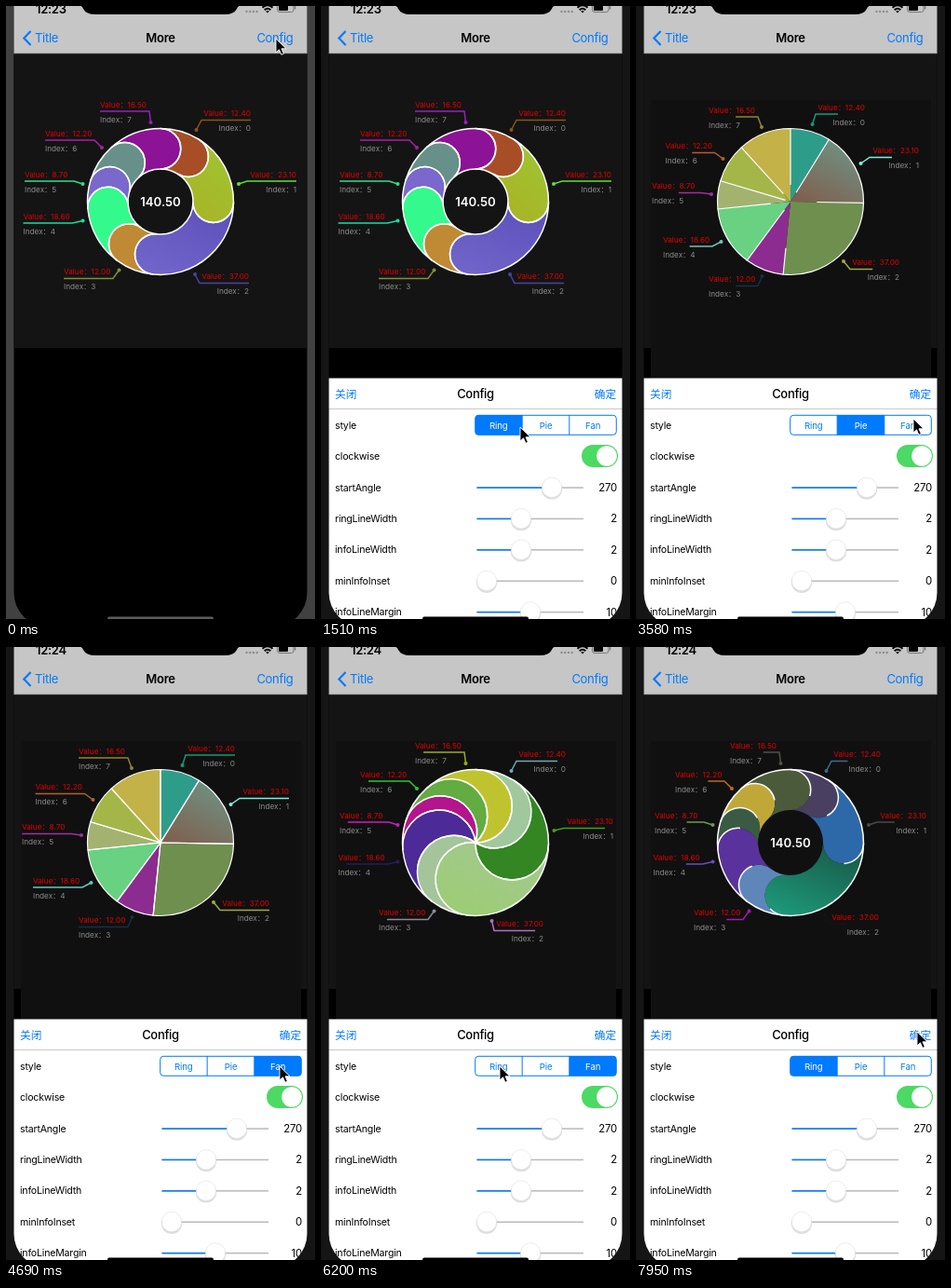
An HTML page that plays this animation: 332x658 px, repeating every 8000 ms.

```html
<!DOCTYPE html>
<html lang="zh-CN">
<head>
<meta charset="utf-8">
<title>Chart config</title>
<style>
html, body { margin: 0; width: 100%; height: 100%; overflow: hidden; background: #414141; }
svg { display: block; }
text { font-family: Inter, "Noto Sans CJK SC", "Noto Sans CJK", sans-serif; }

.nav { font-size: 13px; letter-spacing: -.3px; }
.bold { font-weight: 600; }
.blue { fill: #007aff; }
.mid { text-anchor: middle; }
.end { text-anchor: end; }
.row { font-size: 10.6px; letter-spacing: -.2px; }
.number { font-size: 11.4px; letter-spacing: -.2px; }
.tab { font-size: 9.6px; letter-spacing: -.1px; text-anchor: middle; }
.cjk { font-size: 11.7px; }
.value, .index { font-size: 8.2px; }
.value { fill: #e20000; }
.index { fill: #8c8c8c; }
.edge { fill: none; stroke: #fff; stroke-width: 1.5; }
.pie .edge { stroke-width: 1.2; }
.line { fill: none; stroke-width: 1.5; }
stop { stop-color: var(--to); }

/* Each chart is shown, traced over 1 s, and recoloured over 0.25 s. */
.ring { animation: show-ring 8s step-end infinite; }
.pie { animation: show-pie 8s step-end infinite; }
.fan { animation: show-fan 8s step-end infinite; }
.last { animation: show-last 8s step-end infinite; }
.traced .edge, .traced .line { stroke-dasharray: 1 2; animation: 8s linear infinite; }
.traced stop, .traced .dot { animation: 8s ease infinite; }
.pie .edge, .pie .line { animation-name: trace-pie; }
.fan .edge, .fan .line { animation-name: trace-fan; }
.last .edge, .last .line { animation-name: trace-last; }
.pie stop { animation-name: tint-pie; }
.fan stop { animation-name: tint-fan; }
.last stop { animation-name: tint-last; }
.pie .dot { animation-name: move-pie; }
.fan .dot { animation-name: move-fan; }
.last .dot { animation-name: move-last; }

@keyframes show-ring { 0% { visibility: visible } 37.875%, 100% { visibility: hidden } }
@keyframes show-pie { 0% { visibility: hidden } 37.875% { visibility: visible } 66.75%, 100% { visibility: hidden } }
@keyframes show-fan { 0% { visibility: hidden } 66.75% { visibility: visible } 93.75%, 100% { visibility: hidden } }
@keyframes show-last { 0% { visibility: hidden } 93.75%, 100% { visibility: visible } }
@keyframes trace-pie { 0%, 37.875% { stroke-dashoffset: 1 } 50.375%, 100% { stroke-dashoffset: 0 } }
@keyframes trace-fan { 0%, 66.75% { stroke-dashoffset: 1 } 79.25%, 100% { stroke-dashoffset: 0 } }
@keyframes trace-last { 0%, 93.75% { stroke-dashoffset: 1 } 100% { stroke-dashoffset: .5 } }
@keyframes tint-pie { 0%, 37.875% { stop-color: var(--from) } 41%, 100% { stop-color: var(--to) } }
@keyframes tint-fan { 0%, 66.75% { stop-color: var(--from) } 69.875%, 100% { stop-color: var(--to) } }
@keyframes tint-last { 0%, 93.75% { stop-color: var(--from) } 96.875%, 100% { stop-color: var(--to) } }
@keyframes move-pie { 0%, 37.875% { transform: var(--shift) } 41%, 100% { transform: translate(0, 0) } }
@keyframes move-fan { 0%, 66.75% { transform: var(--shift) } 69.875%, 100% { transform: translate(0, 0) } }
@keyframes move-last { 0%, 93.75% { transform: var(--shift) } 96.875%, 100% { transform: translate(0, 0) } }

.redrawn { animation: show-redrawn 8s step-end infinite; }
@keyframes show-redrawn { 0% { visibility: hidden } 37.875%, 100% { visibility: visible } }

.bezel { animation: dim 8s linear infinite; }
@keyframes dim { 0%, 8.9% { fill: #414141 } 14%, 100% { fill: #151515 } }
.home { animation: home 8s linear infinite; }
@keyframes home { 0%, 8.9% { fill: #5c5c5c } 14%, 100% { fill: #000 } }

.panel { animation: slide 8s linear infinite; }
@keyframes slide {
  0% { transform: translateY(262px) }
  8.9% { transform: translateY(262px); animation-timing-function: cubic-bezier(.25, .7, .25, 1) }
  16.5%, 100% { transform: translateY(0) }
}

.old-time { animation: old-time 8s step-end infinite; }
.new-time { animation: new-time 8s step-end infinite; }
@keyframes old-time { 0% { visibility: visible } 50.5%, 100% { visibility: hidden } }
@keyframes new-time { 0% { visibility: hidden } 50.5%, 100% { visibility: visible } }

.on-Ring { animation: on-ring 8s step-end infinite; }
.on-Pie { animation: on-pie 8s step-end infinite; }
.on-Fan { animation: on-fan 8s step-end infinite; }
@keyframes on-ring { 0% { visibility: visible } 29.75% { visibility: hidden } 82.5%, 100% { visibility: visible } }
@keyframes on-pie { 0% { visibility: hidden } 29.75% { visibility: visible } 58.5%, 100% { visibility: hidden } }
@keyframes on-fan { 0% { visibility: hidden } 58.5% { visibility: visible } 82.5%, 100% { visibility: hidden } }

.confirm { animation: press 8s linear infinite; }
@keyframes press {
  0%, 36.2% { opacity: 1 } 36.3%, 37.875% { opacity: .2 }
  40.6%, 65.5% { opacity: 1 } 65.6%, 66.75% { opacity: .2 }
  70%, 92.8% { opacity: 1 } 92.9%, 93.75% { opacity: .2 }
  97%, 100% { opacity: 1 }
}

.cursor { animation: point 8s ease-in-out infinite, blink 8s step-end infinite; }
@keyframes point {
  0%, 9.25% { transform: translate(290px, 35px) }
  18.8%, 19.6% { transform: translate(214px, 452px) }
  22.9% { transform: translate(302px, 420px) }
  26.1%, 30.5% { transform: translate(241px, 450px) }
  36.2%, 39% { transform: translate(298px, 420px) }
  44.5%, 45% { transform: translate(298px, 443px) }
  49.75%, 58.75% { transform: translate(294px, 450px) }
  65%, 68.2% { transform: translate(306px, 408px) }
  76.75%, 82.75% { transform: translate(192px, 450px) }
  89.6%, 89.9% { transform: translate(294px, 420px) }
  91.4%, 100% { transform: translate(302px, 413px) }
}
@keyframes blink { 0% { visibility: visible } 6.25% { visibility: hidden } 11%, 100% { visibility: visible } }
</style>
</head>
<body>
<svg width="332" height="658" viewBox="0 0 332 658">
  <defs>
    <clipPath id="screen"><rect x="8.5" y="-40" width="315" height="706" rx="36"/></clipPath>
    <clipPath id="tabs"><rect x="165.5" y="439" width="152" height="21.5" rx="3.5"/></clipPath>
  </defs>
  <rect class="bezel" width="332" height="658"/>

  <g clip-path="url(#screen)">
    <rect width="332" height="658"/>
    <rect y="51" width="332" height="316" fill="#141414"/>
    <rect class="redrawn" x="16" y="101" width="301" height="300" fill="#101010"/>
    <rect width="332" height="51" fill="#c6c6c6"/>
    <rect y="50.5" width="332" height=".7" fill="#8a8a8a"/>

    <path d="M78 -1Q82 0 83 3Q86 9 96 9H235Q245 9 248 3Q249 0 253 -1Z"/>
    <g class="nav bold">
      <text class="old-time" x="32" y="8">12:23</text>
      <text class="new-time" x="32" y="8">12:24</text>
      <text class="mid" x="166" y="39">More</text>
    </g>
    <g fill="#8c8c8c">
      <circle cx="258.5" cy="6" r="1.2"/><circle cx="262.2" cy="6" r="1.2"/>
      <circle cx="265.9" cy="6" r="1.2"/><circle cx="269.6" cy="6" r="1.2"/>
    </g>
    <g fill="none" stroke="#000" stroke-width="1.9">
      <path d="M275.5 1.7Q281 -3.3 286.5 1.7M277.7 4.2Q281 1.2 284.3 4.2"/>
      <path d="M279.2 5.6Q281 4.2 282.8 5.6L281 7.4Z" fill="#000" stroke="none"/>
    </g>
    <rect x="291.5" y="-3" width="17.5" height="9.5" rx="2.5" fill="none" stroke="#777"/>
    <rect x="293" y="-1.5" width="10" height="6.5" rx="1"/>
    <rect x="310" y="0" width="1.3" height="3.5" rx=".6" fill="#777"/>
    <path d="M26.5 27L19.3 34.5L26.5 42" fill="none" stroke="#007aff" stroke-width="2.2"/>
    <g class="nav blue">
      <text x="31" y="39">Title</text>
      <text class="end" x="308.5" y="39">Config</text>
    </g>

    <g id="charts"></g>

    <g class="panel">
      <rect y="399.5" width="332" height="262" fill="#fff"/>
      <rect y="432" width="332" height=".9" fill="#c4c4c4"/>
      <text class="nav mid" x="166" y="420.5" font-weight="500">Config</text>
      <text class="cjk blue" x="15" y="420.5">关闭</text>
      <text class="cjk blue confirm" x="293.7" y="420.5">确定</text>
      <g id="rows"></g>
      <rect x="280" y="471" width="39" height="24" rx="12" fill="#4cd964"/>
      <circle cx="307" cy="483" r="10.8" fill="#fff"/>
    </g>
    <rect class="home" x="109" y="655.5" width="114" height="4" rx="2"/>
  </g>

  <path class="cursor" d="M0 0V15L3.5 11.8L5.9 17.3L8.4 16.2L6 10.8H11Z" stroke="#fff" stroke-width=".9"/>
</svg>

<script>
const CX = 166, CY = 210, RADIUS = 78.5, HOLE = 35, LABEL = 53;
const values = [12.4, 23.1, 37, 12, 18.6, 8.7, 12.2, 16.5];
const total = values.reduce((sum, v) => sum + v);

const point = (r, a) =>
  `${(CX + r * Math.cos(a)).toFixed(2)} ${(CY + r * Math.sin(a)).toFixed(2)}`;

// Outer arc, end cap, inner arc, then back along the previous cap.
function slicePath(a0, a1, hole, rounded) {
  const cap = (RADIUS - hole) / 2;
  const side = sweep => rounded ? `A${cap} ${cap} 0 0 ${sweep} ` : 'L';
  const inner = hole ? `A${hole} ${hole} 0 0 0 ${point(hole, a0)}` : '';
  return `M${point(RADIUS, a0)}A${RADIUS} ${RADIUS} 0 0 1 ${point(RADIUS, a1)}` +
    side(1) + point(hole, a1) + inner + side(0) + point(RADIUS, a0);
}

// Callouts: dot x, dot y, elbow x, line y.
const ringSpots = [
  [204.5, 133, 210, 122.5], [250, 191, 259, 188], [203, 288, 208, 297.5], [121.5, 283.5, 115, 292.5],
  [82.5, 230.5, 71.5, 233], [82.5, 191, 73, 188], [103, 152, 95, 144], [155.5, 125, 154, 113]];
const pieSpots = [
  [189.5, 127, 193, 116], [241.5, 169, 251, 162.5], [223, 274, 230, 282.5], [135.5, 290, 131, 300.5],
  [91.5, 253, 82, 258], [81, 202, 70, 200.5], [93.5, 164, 84.5, 157.5], [135, 130, 131, 119]];
const fanSpots = ringSpots.slice();
fanSpots[1] = [250.5, 197, 261, 194.5];
fanSpots[2] = [183.5, 294, 186, 304.5];

// Two colours in one fill entry make a gradient.
const charts = [
  { name: 'ring', hole: HOLE, rounded: true, spots: ringSpots,
    fills: ['#a84e27', '#9fc433 #a9b324', '#5d50ba #7165ca', '#c08a34', '#34f98d', '#7a68cc', '#67908a', '#8c1296'],
    lines: ['#8a5418', '#60e03c', '#4844a4', '#7f8f3c', '#18dca0', '#2fe08a', '#a422a4', '#9a20bc'] },
  { name: 'pie', hole: 0, rounded: false, spots: pieSpots,
    fills: ['#2d9d8a', '#6d9486 #80604f', '#6f8f4f', '#8c2c90', '#68d282', '#a4b270', '#a4b648', '#c2b248'],
    lines: ['#109a78', '#7ff0e0', '#a0a848', '#123048', '#66c8b8', '#a030a0', '#b06030', '#8f8434'] },
  { name: 'fan', hole: 0, rounded: true, spots: fanSpots,
    fills: ['#a0c89c', '#338622', '#a4c890 #9ccd74', '#a4c49a', '#4c2a98', '#b4148c', '#62ac42', '#bfc42e'],
    lines: ['#70a8b8', '#40a020', '#b070c0', '#8a8a9c', '#2a1a66', '#d018c8', '#28c828', '#9cac20'] },
  { name: 'last', hole: HOLE, rounded: true, spots: ringSpots,
    fills: ['#493f60', '#2d68a8', '#195848 #1d9878', '#5f86b8', '#5a329c', '#3b5a44', '#c0a838', '#4a5a3a'],
    lines: ['#46688a', '#4a4a4a', '#141414', '#a018b0', '#6a4ac0', '#6c9a54', '#c06a20', '#54504c'] },
];

const stops = fill => { const [a, b = a] = fill.split(' '); return [a, b]; };

function callout(i, [x, y, elbow, level], [oldX, oldY], color) {
  const right = x > CX;
  const end = elbow + (right ? LABEL : -LABEL);
  const side = right ? ' end' : '';
  return `<path class="line" pathLength="1" stroke="${color}" d="M${x} ${y}L${elbow} ${level}H${end}"/>
    <circle class="dot" cx="${x}" cy="${y}" r="2" fill="${color}" style="--shift:translate(${oldX - x}px,${oldY - y}px)"/>
    <text class="value${side}" x="${end}" y="${level - 4.5}">Value：${values[i].toFixed(2)}</text>
    <text class="index${side}" x="${end}" y="${level + 11.5}">Index：${i}</text>`;
}

function drawChart(chart, n) {
  const before = charts[Math.max(0, n - 1)];
  let angle = -Math.PI / 2, defs = '', fills = '', edges = '', notes = '';
  values.forEach((v, i) => {
    const next = angle + v / total * 2 * Math.PI;
    const d = slicePath(angle, next, chart.hole, chart.rounded);
    const id = `${chart.name}-${i}`, from = stops(before.fills[i]);
    const tints = stops(chart.fills[i]).map((to, k) =>
      `<stop offset="${k}" style="--from:${from[k]};--to:${to}"/>`).join('');
    defs += `<linearGradient id="${id}" x1=".8" y1="0" x2=".2" y2="1">${tints}</linearGradient>`;
    fills += `<path d="${d}" fill="url(#${id})"/>`;
    edges += `<path class="edge" pathLength="1" d="${d}"/>`;
    notes += callout(i, chart.spots[i], before.spots[i], chart.lines[i]);
    angle = next;
  });
  const sum = chart.hole
    ? `<text class="mid bold" x="166" y="215" font-size="13.2" fill="#fff">${total.toFixed(2)}</text>` : '';
  return `<g class="${chart.name}${n ? ' traced' : ''}">${defs}${fills}${edges}${notes}${sum}</g>`;
}
document.getElementById('charts').innerHTML = charts.map(drawChart).join('');

const rowY = i => 450 + i * 33.4;
const label = (name, i) => `<text class="row" x="15" y="${rowY(i) + 3.7}">${name}</text>`;

function slider([name, value, x], i) {
  const y = rowY(i + 2);
  return label(name, i + 2) + `
    <rect x="167.5" y="${y - .5}" width="114.5" height="1.5" fill="#b9b9b9"/>
    <rect x="167.5" y="${y - .5}" width="${x - 167.5}" height="1.5" class="blue"/>
    <circle cx="${x}" cy="${y + 1.8}" r="11.2" opacity=".13"/>
    <circle cx="${x}" cy="${y}" r="10.7" fill="#fff" stroke="#d8d8d8" stroke-width=".5"/>
    <text class="number end" x="318" y="${y + 4.2}">${value}</text>`;
}

const tabNames = ['Ring', 'Pie', 'Fan'], TAB = 152 / 3;
const tabText = (name, i, fill) =>
  `<text class="tab" x="${165.5 + TAB * (i + .5)}" y="453.5" fill="${fill}">${name}</text>`;
const tabs = tabNames.map((name, i) => tabText(name, i, '#007aff')).join('') +
  `<path d="M${165.5 + TAB} 439v21.5M${165.5 + 2 * TAB} 439v21.5" stroke="#007aff"/>` +
  tabNames.map((name, i) => `<g class="on-${name}" clip-path="url(#tabs)">
    <rect class="blue" x="${165.5 + TAB * i}" y="439" width="${TAB}" height="22"/>${tabText(name, i, '#fff')}</g>`).join('') +
  '<rect x="165.7" y="439.3" width="151.6" height="21" rx="3.5" fill="none" stroke="#007aff"/>';

document.getElementById('rows').innerHTML = label('style', 0) + tabs + label('clockwise', 1) + [
  ['startAngle', 270, 248], ['ringLineWidth', 2, 215], ['infoLineWidth', 2, 215],
  ['minInfoInset', 0, 178], ['infoLineMargin', 10, 225],
].map(slider).join('');
</script>
</body>
</html>
```
